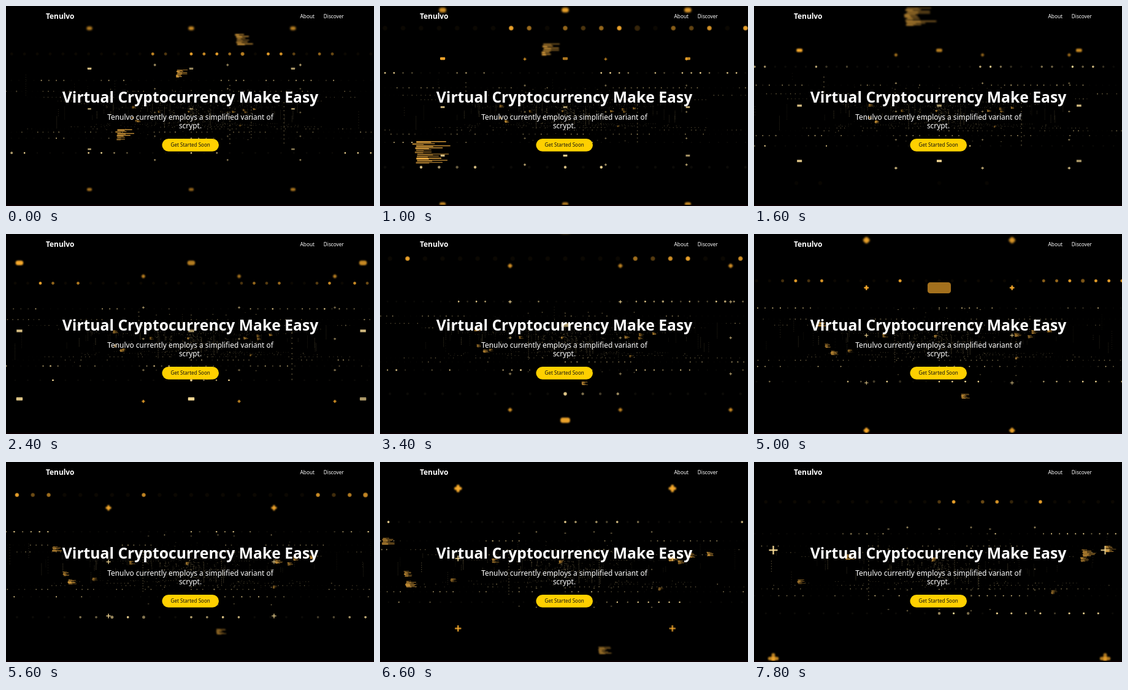
An HTML page with a canvas for the animation above (8 s loop, 600 by 327 pixels).

```html
<!DOCTYPE html>
<html lang="en">
<head>
<meta charset="utf-8">
<title>Tenulvo</title>
<style>
  html, body { margin: 0; width: 100%; height: 100%; overflow: hidden; background: #000; }
  canvas, svg { position: absolute; left: 0; top: 0; width: 600px; height: 327px; }
  text { font-family: "Noto Sans", "Open Sans", sans-serif; fill: #fff; }
  .bold { font-weight: 700; }
  .middle { text-anchor: middle; }
</style>
</head>
<body>
<canvas width="600" height="327"></canvas>
<svg viewBox="0 0 600 327">
  <text class="bold" x="65" y="21.3" font-size="11.9">Tenulvo</text>
  <text x="479.5" y="20" font-size="8.3">About</text>
  <text x="517.8" y="20" font-size="8.2">Discover</text>
  <text class="bold middle" x="300.6" y="157.5" font-size="24.7">Virtual Cryptocurrency Make Easy</text>
  <g class="middle" font-size="11.9">
    <text x="300.5" y="185.6">Tenulvo currently employs a simplified variant of</text>
    <text x="300.5" y="199.7">scrypt.</text>
  </g>
  <rect x="254.5" y="217" width="92.5" height="20.8" rx="10.4" fill="#ffd000"/>
  <text class="middle" x="300.7" y="230.4" font-size="8.05" style="fill:#111">Get Started Soon</text>
</svg>
<script>
const ctx = document.querySelector('canvas').getContext('2d');
const LOOP = 8000, STEP = 200;
const CX = 302, CY = 182.5;          // vanishing point
const SPEED = 0.001688;              // approach per second
const CEILING = -0.61, FLOOR = 0.338, PITCH = 0.1225;

const hash = (a, b = 0) => {
  const v = Math.sin(a * 127.1 + b * 311.7) * 43758.5453;
  return v - Math.floor(v);
};
const clamp = v => Math.max(0, Math.min(1, v));
const between = (low, high, a, b) => low + (high - low) * hash(a, b);

// Pixels per unit for something that passes the viewer in `left` seconds
const scaleAt = left => left > 0.05 ? 1 / (SPEED * left) : 0;
const lens = y => Math.max(0, Math.abs(y - CY) - 60) * 0.035;
const tint = (blur, alpha) =>
  blur < 1 ? `rgba(255,226,155,${alpha})` : `rgba(250,172,45,${alpha})`;

// Code snippets: the nearest ones are placed, the others scattered behind them
const cards = [
  { x: -0.416, y: 0.095, pass: 1.985 },
  { x: 0.24, y: -0.43, pass: 2 },
  { x: -0.12, y: -0.345, pass: 2.84 },
  { x: 0.28, y: 0.655, pass: 9.69 },
  { x: -1.59, y: -0.28, pass: 9.75 },
  { x: -1.5, y: 0.1, pass: 10 }
];
for (let i = 0; i < 9; i++)
  cards.push({ x: between(-2.1, 2.1, i, 21), y: between(-0.4, 0.35, i, 22), pass: 10.5 + i * 0.4 });

function dot(x, y, r, alpha) {
  if (x < -9 || x > 609 || y < -9 || y > 336 || alpha < 0.02) return;
  const blur = lens(y);
  if (r < 0.9 && blur < 0.7) {
    ctx.fillStyle = tint(0, alpha);
    ctx.fillRect(x - r, y - r, 2 * r, 2 * r);
    return;
  }
  const radius = r + blur * 0.8 + 0.4;
  const glow = ctx.createRadialGradient(x, y, 0, x, y, radius);
  glow.addColorStop(0, tint(blur, alpha));
  glow.addColorStop(0.65, tint(blur, alpha * 0.85));
  glow.addColorStop(1, tint(blur, 0));
  ctx.fillStyle = glow;
  ctx.fillRect(x - radius, y - radius, 2 * radius, 2 * radius);
}

function mark(x, y, w, h, alpha) {
  if (x < -30 || x > 630 || y < -30 || y > 357) return;
  const blur = lens(y), bw = w + blur * 1.2, bh = h + blur * 1.2;
  ctx.filter = `blur(${0.3 + blur * 0.35}px)`;
  ctx.fillStyle = tint(blur, alpha);
  ctx.beginPath();
  ctx.roundRect(x - bw / 2, y - bh / 2, bw, bh, Math.min(bw, bh) * Math.min(0.5, blur * 0.2));
  ctx.fill();
  ctx.filter = 'none';
}

// A wall of crosses or bars standing across the flight path
function drawWall(left, columns, cross) {
  const s = scaleAt(left);
  if (!s) return;
  for (const column of columns) for (let k = -2; k <= 2; k++) {
    const x = CX + column * s, y = CY + (-0.142 + 0.655 * k) * s;
    const alpha = clamp(0.25 + s / 170) * between(0.65, 1, column, k);
    if (cross) {
      const arm = s * 0.052, thick = s * 0.008 + 0.3;
      mark(x, y, arm, thick, alpha);
      mark(x, y, thick, arm, alpha);
    } else mark(x, y, s * 0.055, s * 0.025, alpha);
  }
}

// Ceiling and floor lights: clusters lit at random, slowly changing brightness
function drawRow(index, t) {
  const s = scaleAt(3.47 + 2.47 * index - t);
  const fade = clamp((320 - s) / 80);
  if (!s || !fade) return;
  const reach = Math.min(40, Math.ceil(300 / (s * PITCH)));
  for (const side of [CEILING, FLOOR]) for (let n = -reach; n <= reach; n++) {
    const seed = index + side;
    const lit = hash(Math.floor(n / 4), seed) > 0.5 && hash(n, seed + 1) > 0.2;
    const pulse = hash(n, seed + 2);
    const shine = lit ? 0.2 + 0.8 * Math.abs(Math.sin(t * 0.8 + pulse * 6)) : 0.05;
    const size = (0.3 + s * 0.006) * (lit && pulse > 0.9 ? 1.5 : 1);
    dot(CX + n * PITCH * s, CY + side * s, size, shine * fade * clamp(s / 130));
  }
}

function drawCard({ x: cx, y: cy, pass }, index, t) {
  const s = scaleAt(pass - t);
  const x = CX + cx * s, y = CY + cy * s, w = s * 0.125, h = s * 0.062;
  if (!s || x > 610 || x + w < -10 || y < -40 || y > 360) return;
  const lines = s > 400 ? 11 : 6;
  ctx.filter = `blur(${0.35 + lens(y) * 0.4}px)`;
  for (let i = 0; i < lines; i++) {
    const indent = w * 0.12 * hash(i, index + 1);
    const length = w * between(0.3, 0.88, i, index + 3);
    const top = y - h / 2 + h * i / lines;
    ctx.fillStyle = `rgba(255,185,70,${between(0.5, 1, i, index + 5)})`;
    ctx.fillRect(x + indent, top, length * 0.5, h / lines * 0.8);
    ctx.fillRect(x + indent + length * 0.5, top, length * 0.5, h / lines * 0.45);
  }
  ctx.filter = 'none';
}

// Hanging dotted threads, every eighth one brighter and longer
function drawThreads(t) {
  for (let i = 0; i < 72; i++) {
    const bright = i % 8 === 0;
    const s = scaleAt(3.5 + (hash(i, 1) * 14 - t + 28) % 14);
    const x = CX + between(-4, 4, i, 2) * s;
    const top = between(CEILING, 0, i, 3);
    const bottom = Math.min(FLOOR, top + between(0.08, bright ? 0.9 : 0.35, i, 4));
    const alpha = bright ? 0.35 : between(0.06, 0.22, i, 5);
    for (let y = top; y < bottom; y += bright ? 0.05 : 0.032)
      dot(x, CY + y * s, bright ? 0.4 + s * 0.003 : 0.5, alpha);
  }
}

// Specks in the distance, densest around the vanishing point
function drawSpecks(t) {
  for (let i = 0; i < 260; i++) {
    const s = scaleAt(6 + (hash(i, 11) * 18 - t + 36) % 18);
    const x = between(-1, 1, i, 12) * between(0.2, 2.6, i, 15);
    const y = between(CEILING, FLOOR, i, 13);
    dot(CX + x * s, CY + y * s, 0.5, between(0.08, 0.45, i, 14));
  }
}

function draw(t) {
  ctx.fillStyle = '#000';
  ctx.fillRect(0, 0, 600, 327);
  drawThreads(t);
  drawSpecks(t);
  for (let i = 8; i >= 0; i--) drawRow(i, t);
  drawWall(19.6 - t, [-1.65, 0, 1.65], false);
  drawWall(19.2 - t, [-1, 1, 3], true);
  drawWall(9.99 - t, [-1, 1, 3], true);
  drawWall(5.89 - t, [-1.65, 0, 1.65], false);
  cards.forEach((card, i) => drawCard(card, i, t));
  ctx.fillStyle = '#0c0003';
  ctx.fillRect(0, 325, 600, 2);
}

let shown = -1;
function tick() {
  const step = Math.floor(performance.now() % LOOP / STEP);
  if (step !== shown) draw((shown = step) * STEP / 1000);
  requestAnimationFrame(tick);
}
tick();
</script>
</body>
</html>
```
